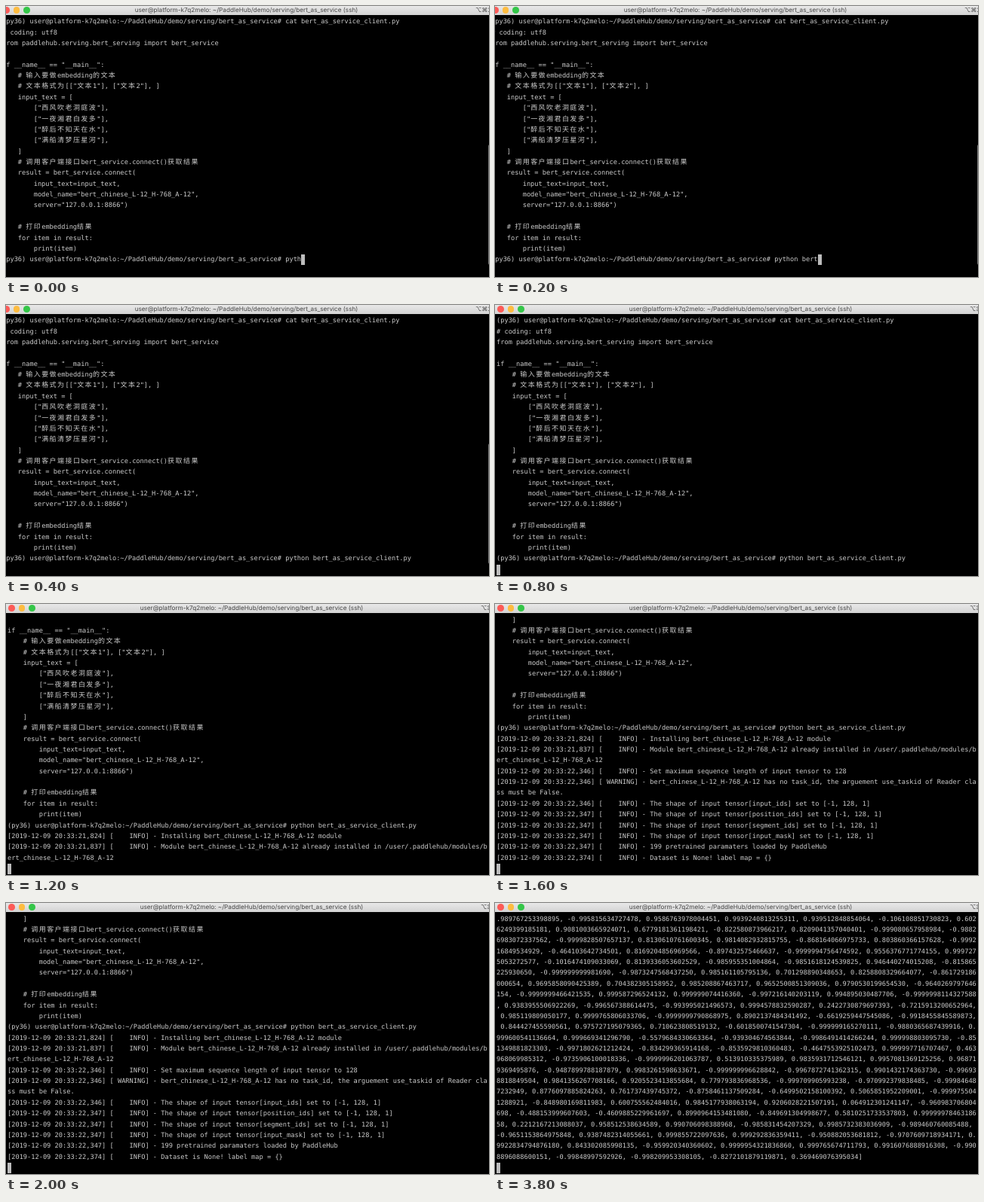
Write an HTML page that moves like this. It is 640 by 360 pixels and loops after 4 s.

```html
<!DOCTYPE html>
<html lang="en">
<head>
<meta charset="utf-8">
<title>Terminal session</title>
<style>
  html, body { margin: 0; width: 100%; height: 100%; overflow: hidden; background: #000; }
  #stage { position: relative; width: 640px; height: 360px; overflow: hidden; background: #000; }
  #window { position: absolute; left: 0; top: 0; width: 660px; height: 360px; animation: shift 4s step-end infinite; }

  #bar {
    position: absolute; z-index: 2; left: -20px; right: 0; top: 0; height: 11.5px;
    background: linear-gradient(#e8e8e8, #d3d3d3);
  }
  .light { position: absolute; z-index: 3; top: 1px; width: 8.6px; height: 8.6px; border-radius: 50%; }
  .label {
    position: absolute; z-index: 3; top: 0; white-space: pre; color: #484848;
    font: 8.2px/11px Inter, "DejaVu Sans", sans-serif; text-rendering: geometricPrecision;
  }
  #title { left: 0; width: 651px; text-align: center; }
  #thumb {
    position: absolute; z-index: 4; left: 645.5px; top: 184px; width: 5px; height: 160px;
    border-radius: 2.5px; background: #777;
  }

  .screen {
    position: absolute; left: 0; top: 0; width: 660px; height: 360px;
    background: #000; color: #cbcbcb;
    font: 8.674px/14.364px "DejaVu Sans Mono", monospace;
    text-rendering: geometricPrecision; font-variant-ligatures: none;
    animation: 4s step-end infinite;
  }
  .line { position: absolute; left: 2px; height: 14.364px; white-space: pre; }
  .han {
    font-family: "Noto Sans CJK SC", "Noto Sans CJK", sans-serif;
    font-size: 9px; line-height: 0; letter-spacing: 1.444px;
  }
  .cursor { display: inline-block; vertical-align: top; width: 5.2px; height: 14.2px; background: #bdbdbd; }

  #s1 { animation-name: at5; }
  #s2 { animation-name: at10; }
  #s3 { animation-name: at25; }
  #s4 { animation-name: at40; }
  #s5 { animation-name: at95; }
  @keyframes shift { 0% { left: -7px; } 20%, 100% { left: 0; } }
  @keyframes at5 { 0% { visibility: hidden; } 5%, 100% { visibility: visible; } }
  @keyframes at10 { 0% { visibility: hidden; } 10%, 100% { visibility: visible; } }
  @keyframes at25 { 0% { visibility: hidden; } 25%, 100% { visibility: visible; } }
  @keyframes at40 { 0% { visibility: hidden; } 40%, 100% { visibility: visible; } }
  @keyframes at95 { 0% { visibility: hidden; } 95%, 100% { visibility: visible; } }
</style>
</head>
<body>
<div id="stage">
  <div id="window">
    <div id="bar"></div>
    <div class="light" style="left:3.2px;background:#fc5b57"></div>
    <div class="light" style="left:16.7px;background:#fdbc40"></div>
    <div class="light" style="left:30.2px;background:#34c648"></div>
    <div class="label" id="title">user@platform-k7q2melo: ~/PaddleHub/demo/serving/bert_as_service (ssh)</div>
    <div class="label" style="left:629px">⌥⌘2</div>
    <div id="thumb"></div>
  </div>
</div>
<script>
const ROW = 14.364;
const TOP = 14.6;
const COLS = 122;
const model = 'bert_chinese_L-12_H-768_A-12';
const prompt = '(py36) user@platform-k7q2melo:~/PaddleHub/demo/serving/bert_as_service# ';
const command = 'python bert_as_service_client.py';

const listing = `${prompt}cat bert_as_service_client.py
# coding: utf8
from paddlehub.serving.bert_serving import bert_service

if __name__ == "__main__":
    # 输入要做embedding的文本
    # 文本格式为[["文本1"], ["文本2"], ]
    input_text = [
        ["西风吹老洞庭波"],
        ["一夜湘君白发多"],
        ["醉后不知天在水"],
        ["满船清梦压星河"],
    ]
    # 调用客户端接口bert_service.connect()获取结果
    result = bert_service.connect(
        input_text=input_text,
        model_name="${model}",
        server="127.0.0.1:8866")

    # 打印embedding结果
    for item in result:
        print(item)`.split('\n');

const log = (time, text, level = 'INFO') =>
  `[2019-12-09 20:33:${time}] [${level.padStart(8)}] - ${text}`;
const shape = name => log(name === 'input_ids' ? '22,346' : '22,347',
  `The shape of input tensor[${name}] set to [-1, 128, 1]`);

// Long lines break at the last column.
const wrap = text => text.match(new RegExp(`.{1,${COLS}}`, 'g'));

const loading = [
  log('21,824', `Installing ${model} module`),
  log('21,837', `Module ${model} already installed in /user/.paddlehub/modules/${model}`),
].flatMap(wrap);

const running = [
  log('22,346', 'Set maximum sequence length of input tensor to 128'),
  log('22,346', `${model} has no task_id, the arguement use_taskid of Reader class must be False.`, 'WARNING'),
  ...['input_ids', 'position_ids', 'segment_ids', 'input_mask'].map(shape),
  log('22,347', '199 pretrained paramaters loaded by PaddleHub'),
  log('22,374', 'Dataset is None! label map = {}'),
].flatMap(wrap);

let seed = 768;
const random = () => (seed = (seed * 1664525 + 1013904223) % 2 ** 32) / 2 ** 32;

// Embedding values crowd towards 1 and -1.
const value = () => {
  const sign = random() < 0.5 ? '-' : '';
  const size = 1 - random() ** 5 * 0.95;
  return sign + size.toFixed(random() < 0.5 ? 15 : 16);
};
const values = Array.from({ length: 150 }, value).join(', ') + ', -0.990';

const output = [
  '.989767253398895, -0.995815634727478, 0.9586763978004451, 0.9939240813255311, 0.939512848854064, -0.106108851730823, 0.602',
  '6249399185181, 0.9081003665924071, 0.6779181361198421, -0.822580873966217, 0.8209041357040401, -0.999080657958984, -0.9882',
  ...wrap(values.slice(-20 * COLS)),
  '8896088600151, -0.99848997592926, -0.998209953308105, -0.8272101879119871, 0.369469076395034]',
];

const typed = text => [...listing, prompt + text];
const entered = typed(command);

// Each screen shows the last 24 rows, with the cursor after the final one.
const screens = [
  typed('pyth'),
  typed('python bert'),
  [...entered, ''],
  [...entered, ...loading, ''],
  [...entered, ...loading, ...running, ''],
  [...output, ''],
];

const styled = text => text.replace(/[\u4e00-\u9fff]+/g, '<span class="han">$&</span>');

screens.forEach((lines, n) => {
  const screen = document.createElement('div');
  const top = n < 3 ? TOP - 0.3 : TOP;
  const last = lines.slice(-24);
  screen.className = 'screen';
  screen.id = 's' + n;
  screen.innerHTML = last.map((text, row) => {
    const cursor = row === last.length - 1 ? '<i class="cursor"></i>' : '';
    return `<div class="line" style="top:${top + row * ROW}px">${styled(text)}${cursor}</div>`;
  }).join('');
  document.getElementById('window').append(screen);
});
</script>
</body>
</html>
```
